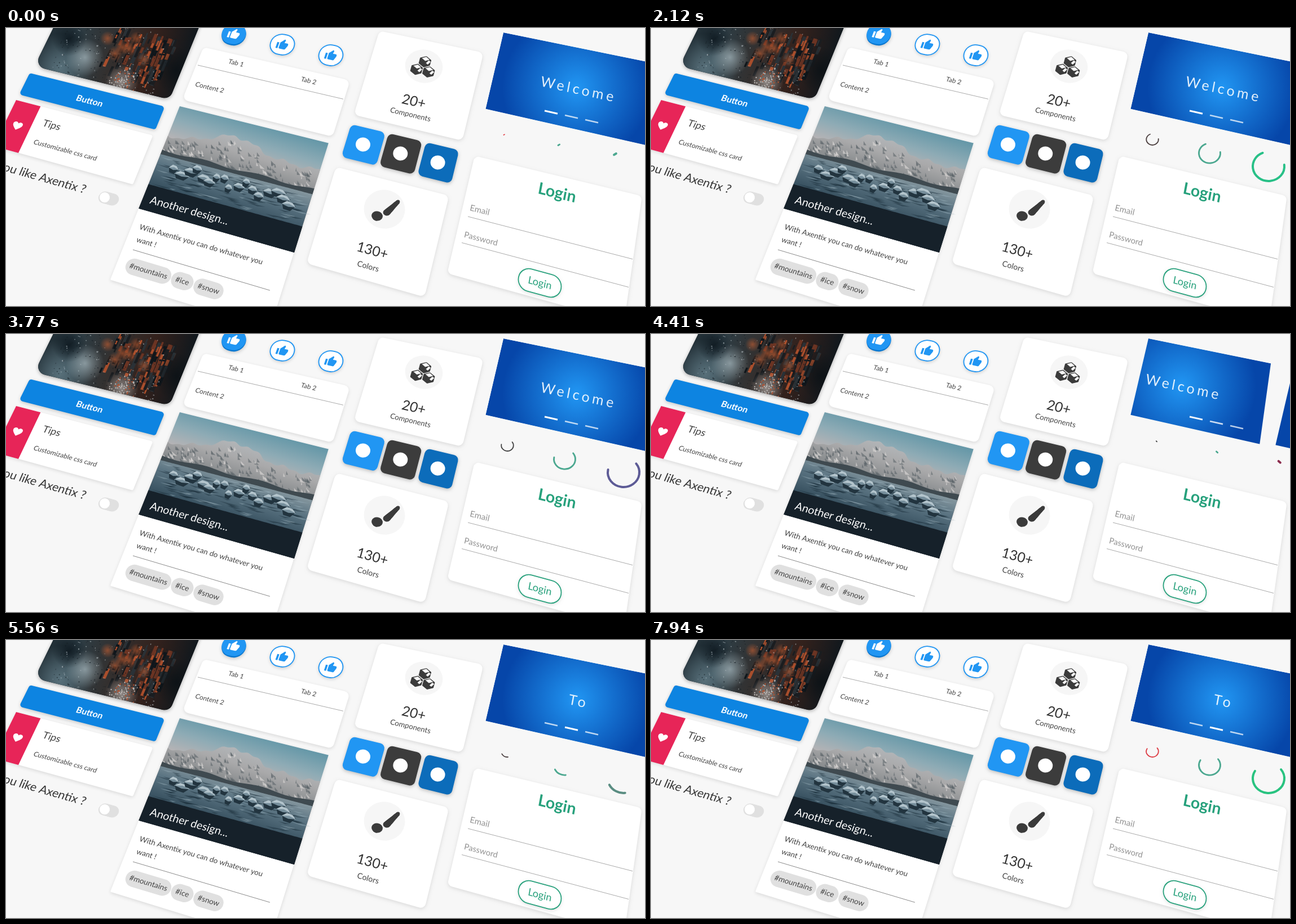
Recreate the animation shown at these times as an HTML page with a canvas. Size 1133 by 494 pixels, loop 8000 ms.

```html
<!DOCTYPE html>
<html lang="en">
<head>
<meta charset="utf-8">
<title>UI components</title>
<style>
html, body { margin: 0; width: 100%; height: 100%; overflow: hidden; background: #f7f7f7; }
canvas { display: block; }
</style>
</head>
<body>
<canvas id="stage" width="1133" height="494"></canvas>
<script>
const W = 1133, H = 494, LOOP = 8000;
const BLUE = '#2196f3', DARK = '#3b3b3b', INK = '#444', GREEN = '#27a17c', GREY = '#e0e0e0', PAPER = '#f6f6f6';
const screen = document.getElementById('stage').getContext('2d');
const backdrop = document.createElement('canvas');
backdrop.width = W;
backdrop.height = H;
let g = backdrop.getContext('2d');

// The page is a tilted plane: its rows and columns run towards two vanishing points.
const ROWS = [-5344, -1262], COLS = [1610, -3117];

function away([x, y], [vx, vy]) {
  const n = Math.hypot(x - vx, y - vy);
  return [(x - vx) / n, (y - vy) / n];
}

// Where the row through p crosses the column through q
function cross(p, q) {
  const [a, b] = away(p, ROWS), [c, d] = away(q, COLS);
  const k = ((q[0] - p[0]) * d - (q[1] - p[1]) * c) / (a * d - b * c);
  return [p[0] + a * k, p[1] + b * k];
}

// Rectangle on the plane, from its top left and bottom right corners
const sheet = (x1, y1, x2, y2) => {
  const p = [x1, y1], q = [x2, y2];
  return [p, cross(p, q), q, cross(q, p)];
};

function at(x, y, draw) {
  g.save();
  g.transform(...away([x, y], ROWS), ...away([x, y], COLS), x, y);
  draw();
  g.restore();
}

function shadow(alpha) {
  g.shadowColor = `rgba(0,0,0,${alpha})`;
  g.shadowBlur = alpha ? 6 : 0;
  g.shadowOffsetY = alpha ? 2 : 0;
}

function trace(pts, r = 0) {
  const n = pts.length, [a, b] = [pts[n - 1], pts[0]];
  g.beginPath();
  g.moveTo((a[0] + b[0]) / 2, (a[1] + b[1]) / 2);
  pts.forEach((p, i) => g.arcTo(...p, ...pts[(i + 1) % n], r));
  g.closePath();
}

function poly(pts, color, r = 0, depth = 0) {
  shadow(depth);
  trace(pts, r);
  g.fillStyle = color;
  g.fill();
  shadow(0);
}

function card(x1, y1, x2, y2, color = '#fff', r = 9, depth = 0.12) {
  poly(sheet(x1, y1, x2, y2), color, r, depth);
}

function rule(x, y, length, color = '#aaa', width = 1) {
  const [a, b] = away([x, y], ROWS);
  g.beginPath();
  g.moveTo(x, y);
  g.lineTo(x + length, y + length * b / a);
  g.strokeStyle = color;
  g.lineWidth = width;
  g.stroke();
}

function text(str, x, y, size, { color = INK, weight = 400, align = 'center', gap = 0 } = {}) {
  at(x, y, () => {
    g.font = `${weight} ${size}px Lato, sans-serif`;
    g.letterSpacing = gap + 'px';
    g.textAlign = align;
    g.textBaseline = 'middle';
    g.fillStyle = color;
    g.fillText(str, 0, 0);
  });
}

function pill(x, y, w, h, fill, border, depth = 0) {
  at(x, y, () => {
    g.beginPath();
    g.roundRect(-w / 2, -h / 2, w, h, h / 2);
    g.fillStyle = fill;
    shadow(depth);
    g.fill();
    shadow(0);
    if (border) {
      g.strokeStyle = border;
      g.lineWidth = 1.8;
      g.stroke();
    }
  });
}

function dot(x, y, rx, ry, color) {
  g.beginPath();
  g.ellipse(x, y, rx, ry, 0.2, 0, Math.PI * 2);
  g.fillStyle = color;
  g.fill();
}

function icon(d, x, y, scale, color) {
  at(x, y, () => {
    g.scale(scale, scale);
    g.translate(-12, -12);
    g.fillStyle = color;
    g.fill(new Path2D(d));
  });
}

function random(seed) {
  return () => (seed = (seed * 16807) % 2147483647) / 2147483647;
}

function fade(x1, y1, x2, y2, ...colors) {
  const f = g.createLinearGradient(x1, y1, x2, y2);
  colors.forEach((c, i) => f.addColorStop(i / (colors.length - 1), c));
  return f;
}

function glow(x, y, r, rgb, alpha) {
  const f = g.createRadialGradient(x, y, 0, x, y, r);
  f.addColorStop(0, `rgba(${rgb},${alpha})`);
  f.addColorStop(1, `rgba(${rgb},0)`);
  dot(x, y, r, r, f);
}

// Maps the unit square onto four corners.
const inside = q => (s, t) => [0, 1].map(k =>
  (q[0][k] * (1 - s) + q[1][k] * s) * (1 - t) + (q[3][k] * (1 - s) + q[2][k] * s) * t);

function streetPhoto() {
  const frame = sheet(118, -70, 290, 127), p = inside(frame);
  poly(frame, '#141c22', 15, 0.3);
  g.save();
  trace(frame, 15);
  g.clip();
  poly(frame, fade(60, 0, 320, 70, '#1b272e', '#2d3d45', '#33302f', '#33211c', '#12181d'));
  glow(95, 70, 60, '120,150,162', 0.6);
  glow(140, 52, 34, '190,208,214', 0.6);
  glow(112, 20, 30, '10,20,27', 0.8);
  const rnd = random(7);
  // Shop fronts: slim lit and dark panes along the right-hand row of houses
  for (let i = 0; i < 130; i++) {
    const s = 0.43 + rnd() * 0.45, t = 0.3 + rnd() * 0.5, w = 0.008 + rnd() * 0.02, h = 0.04 + rnd() * 0.12;
    const tone = ['#0f161b', '#1a1d20', '#6b3423', '#a84e2c', '#2a3136'][i % 5];
    poly([p(s, t), p(s + w, t), p(s + w, t + h), p(s, t + h)], tone);
  }
  for (let i = 0; i < 6; i++) glow(180 + i * 13, 14 + rnd() * 50, 13, '215,100,50', 0.55);
  glow(205, 96, 30, '205,200,196', 0.6);
  glow(303, 75, 42, '12,18,22', 0.9);
  for (let i = 0; i < 260; i++) {
    const [x, y] = p(0.1 + rnd() * 0.8, 0.3 + rnd() * 0.7);
    dot(x, y, 0.5 + rnd(), 0.5 + rnd(), i % 3 ? 'rgba(20,28,34,.5)' : 'rgba(205,215,220,.5)');
  }
  for (let i = 0; i < 70; i++) {
    dot(205 + (rnd() + rnd() - 1) * 30, 92 + (rnd() + rnd() - 1) * 24, 1.2, 1.2, i % 3 ? '#b9b5b2' : '#b2512f');
  }
  g.restore();
}

function lakePhoto() {
  const quad = sheet(308, 139, 511, 399), p = inside(quad);
  // Everything below a wavy line, down to the level `low`
  const below = (line, low, color) => {
    const top = Array.from({ length: 81 }, (_, i) => p(i / 80, line(i / 80)));
    poly([...top, p(1, low), p(0, low)], color);
  };
  const ridge = s => 0.29 - 0.13 * Math.exp(-(((s - 0.42) / 0.2) ** 2)) - 0.04 * s
    + 0.013 * Math.sin(s * 31) + 0.008 * Math.sin(s * 73);
  poly(quad, fade(350, 140, 318, 245, '#6698a8', '#8eabb5', '#b9b4b5', '#d3b5ab'));
  below(ridge, 0.47, fade(400, 185, 382, 245, '#b3b7ba', '#a9a9aa', '#8b8e90'));
  const rnd = random(29);
  // Rock showing through the snow
  for (let i = 0; i < 150; i++) {
    const s = rnd() * 0.97, t = ridge(s) + 0.015 + rnd() * (0.42 - ridge(s)), w = 0.01 + rnd() * 0.035;
    poly([p(s, t), p(s + w, t + 0.03), p(s + w / 3, t + 0.035)], i % 3 ? 'rgba(85,94,101,.55)' : 'rgba(214,211,209,.7)');
  }
  below(s => 0.425 + 0.01 * Math.sin(s * 17), 0.48, '#3f4a50');
  below(s => 0.468, 1, fade(400, 240, 365, 350, '#93a2a8', '#5b7482', '#3a5362', '#223845'));
  for (let i = 0; i < 130; i++) {
    const s = rnd() * 0.9, t = 0.48 + rnd() * 0.27, w = 0.04 + rnd() * 0.1;
    poly([p(s, t), p(s + w, t - 0.004), p(s + w * 0.6, t + 0.009)], i % 3 ? 'rgba(28,48,60,.5)' : 'rgba(150,172,183,.45)');
  }
  // Ice floes, each with a dark reflection
  for (let i = 0; i < 17; i++) {
    const s = 0.08 + i * 0.047, t = 0.54 + 0.05 * Math.sin(i * 1.7) + 0.03 * rnd(), w = 0.05 + rnd() * 0.06;
    poly([p(s, t), p(s + w, t), p(s + w * 0.7, t + 0.055), p(s + w * 0.2, t + 0.05)], '#22343f');
    poly([p(s, t + 0.01), p(s + w * 0.3, t - 0.025), p(s + w * 0.7, t - 0.02), p(s + w, t + 0.01)], '#b3c4cc');
    poly([p(s, t + 0.01), p(s + w * 0.5, t - 0.005), p(s + w, t + 0.01), p(s + w * 0.5, t + 0.022)], '#768e9b');
  }
  below(() => 0.762, 1, '#16212a');
}

function cubes(x, y) {
  const spoke = (cx, cy, r) => i => [cx + r * Math.cos((i + 0.5) * Math.PI / 3), cy + r * Math.sin((i + 0.5) * Math.PI / 3)];
  at(x, y, () => {
    g.scale(1, 0.87);
    for (let k = 0; k < 3; k++) {
      const [cx, cy] = spoke(0, 0, 12.6)(2 * k);
      poly([0, 1, 2, 3, 4, 5].map(spoke(cx, cy, 11.8)), DARK, 1.5);
      // Open top and right faces
      [[3, 4, 5], [5, 0]].forEach((ids, face) => {
        const [mx, my] = spoke(cx, cy, 6)(face ? 5.5 : 4);
        const v = spoke(mx, my, face ? 4.4 : 7);
        poly(face ? [v(4), v(5), v(1), v(2)] : [v(2.5), v(4), v(5.5), v(1)].map(([a, b]) => [a, my + (b - my) * 0.6]), PAPER);
      });
    }
  });
}

function brush() {
  g.strokeStyle = g.fillStyle = DARK;
  g.lineCap = 'round';
  for (let i = 0; i <= 20; i++) dot(675 + i, 328 - i * 0.95, 6.5 - i * 0.16, 5.5 - i * 0.1, DARK);
  g.lineCap = 'butt';
  dot(658, 334, 10, 8.5, DARK);
  poly([[645, 337], [650, 337], [655, 328], [666, 340], [656, 343]], DARK, 2);
}

const THUMB = 'M1 21h4V9H1zM23 10c0-1-1-2-2-2h-6l1-5c0-1 0-1-2-2L8 7.500C7 8 7 8.500 7 9v10c0 1 1 2 2 2h9c1 0 1.500-.5 2-1l3-8z';
const HEART = 'M12 21C5 15 2 12 2 8c0-5 7-7 10-2 3-5 10-3 10 2 0 4-3 7-10 13z';

function columnOne() {
  streetPhoto();
  card(42, 80, 265, 180.500, '#0d84e1', 5, 0.2);
  text('Button', 148, 130, 15.7, { color: '#fff', weight: 700 });
  card(18, 128, 225, 278, '#fff', 3);
  card(18, 128, 22, 222, '#e72558', 0, 0);
  icon(HEART, 20, 174, 0.84, '#fff');
  text('Tips', 81, 173, 17.6);
  text('Customizable css card', 105, 217.500, 12);
  text('Do you like Axentix ?', 141, 288, 21, { align: 'right', color: '#333' });
  pill(182, 303, 36, 22, GREY);
  dot(175, 301, 9, 9, '#fff');
}

function columnTwo() {
  for (let i = 0; i < 3; i++) {
    const x = 404 + 86 * i, y = 10.500 + 19 * i;
    if (!i) pill(x, y + 2, 42, 38, '#0b78d0', null, 0.2);
    pill(x, y, 42, 37, i ? '#fff' : BLUE, i && BLUE, i && 0.2);
    icon(THUMB, x, y, 0.9, i ? BLUE : '#fff');
  }

  card(350, 34, 579, 193);
  rule(340, 66, 258);
  text('Tab 1', 408, 62.500, 11.6);
  text('Tab 2', 536.500, 94, 11.6);
  text('Content 2', 361, 106, 11.8);

  card(308, 139, 468, 535, '#fff', 2);
  lakePhoto();
  text('Another design...', 325, 325, 19.4, { color: '#fff' });
  text('With Axentix you can do whatever you', 346, 385, 13.3);
  text('want !', 249, 381, 13.3);
  rule(225, 394, 243, '#8a8a8a');
  [['#mountains', 252.500, 83], ['#ice', 312.500, 40], ['#snow', 359, 54]].forEach(([tag, x, w]) => {
    const y = 432 + (x - 252) * 0.295;
    pill(x, y, w, 30, GREY);
    text(tag, x, y, 13.5);
  });
}

function columnThree() {
  card(662, 5, 809, 200);
  dot(741, 68, 33.500, 29.500, PAPER);
  cubes(740, 70.500);
  text('20+', 723, 131, 24.5, { color: '#333' });
  text('Components', 717, 154, 13.1);

  // Social buttons with plain dots as marks
  [BLUE, '#3c3c3c', '#0c6cba'].forEach((color, i) => {
    const x = 612 + 66.3 * i, y = 171 + 16 * i;
    card(x, y, x + 44.500, y + 73.500, color, 9, 0.25);
    dot(x + 21, y + 36, 13, 12.5, '#fff');
  });

  card(585, 247, 742, 478);
  dot(671, 322, 36.500, 34.500, PAPER);
  brush();
  text('130+', 649.500, 396, 24.5, { color: '#333' });
  text('Colors', 642, 424, 14);
}

function loginForm() {
  card(831, 227, 1096, 523);
  text('Login', 977, 293.500, 28.5, { color: GREEN, weight: 700 });
  text('Email', 840, 324, 15, { color: '#929292' });
  rule(819, 335, 292);
  text('Password', 842, 375, 14.6, { color: '#929292' });
  rule(808, 381.500, 296);
  pill(946.500, 453, 78, 40, '#fff', GREEN, 0.15);
  text('Login', 946.500, 453.500, 18.3, { color: GREEN });
}

const ease = x => (1 - Math.cos(Math.PI * Math.min(1, Math.max(0, x)))) / 2;

function slide(label, shift) {
  g.save();
  g.translate(328 * shift, 68 * shift);
  const light = g.createRadialGradient(1012, 106, 0, 1012, 106, 132);
  light.addColorStop(0, BLUE);
  light.addColorStop(1, '#0646a9');
  card(882, 8, 1150, 212, light, 0, 0);
  text(label, 1015, 110, 25, { color: 'rgba(255,255,255,.88)', gap: 4.8 });
  g.restore();
}

function carousel(time) {
  const p = ease((time - 4257) / 500);
  g.save();
  trace(sheet(882, 8, 1200, 223));
  g.clip();
  if (p < 1) slide('Welcome', -p);
  if (p > 0) slide('To', 1 - p);
  g.restore();
  [1 - p, p, 0].forEach((lit, i) =>
    rule(955 + 36 * i, 147 + 8 * i, 23, `rgba(255,255,255,${0.72 + 0.28 * lit})`, 2.6 + 0.5 * lit));
}

const TEAL = [76, 168, 144], RED = [226, 60, 68], SOOT = [64, 64, 64];
const CYCLE = [TEAL, [46, 226, 50], [33, 150, 243], [140, 45, 78], TEAL];
const mix = (a, b, k) => `rgb(${a.map((c, i) => Math.round(c + (b[i] - c) * k))})`;

function spinners(time) {
  const phase = ((time * 1.02 + 75) % 1500) / 750;
  const grow = ease(phase), slip = ease(phase - 1);
  const start = 35 * grow + 89 * slip;
  const end = Math.min(125.66, start + 1 + 88 * grow);
  const turn = (230 + time * 0.1806) * Math.PI / 180;
  const arc = (x, y, r, width, color) => {
    g.beginPath();
    g.ellipse(x, y, r, r * 0.925, 0, turn + start / 20, turn + end / 20);
    g.lineCap = 'round';
    g.lineWidth = width;
    g.strokeStyle = color;
    g.stroke();
    g.lineCap = 'butt';
  };
  const hue = (time % 5880) / 1470, i = Math.floor(hue);
  arc(889, 198, 10.8, 1.8, mix(SOOT, RED, Math.cos(Math.PI * time / 7700) ** 6));
  arc(990.500, 222.500, 19, 2.9, mix(TEAL, TEAL, 0));
  arc(1095, 246, 28, 4, mix(CYCLE[i], CYCLE[i + 1], hue - i));
}

g.fillStyle = '#f7f7f7';
g.fillRect(0, 0, W, H);
columnOne();
columnTwo();
columnThree();
loginForm();
g = screen;

const began = performance.now();
function frame() {
  const time = (performance.now() - began) % LOOP;
  g.drawImage(backdrop, 0, 0);
  carousel(time);
  spinners(time);
  requestAnimationFrame(frame);
}
frame();
</script>
</body>
</html>
```
